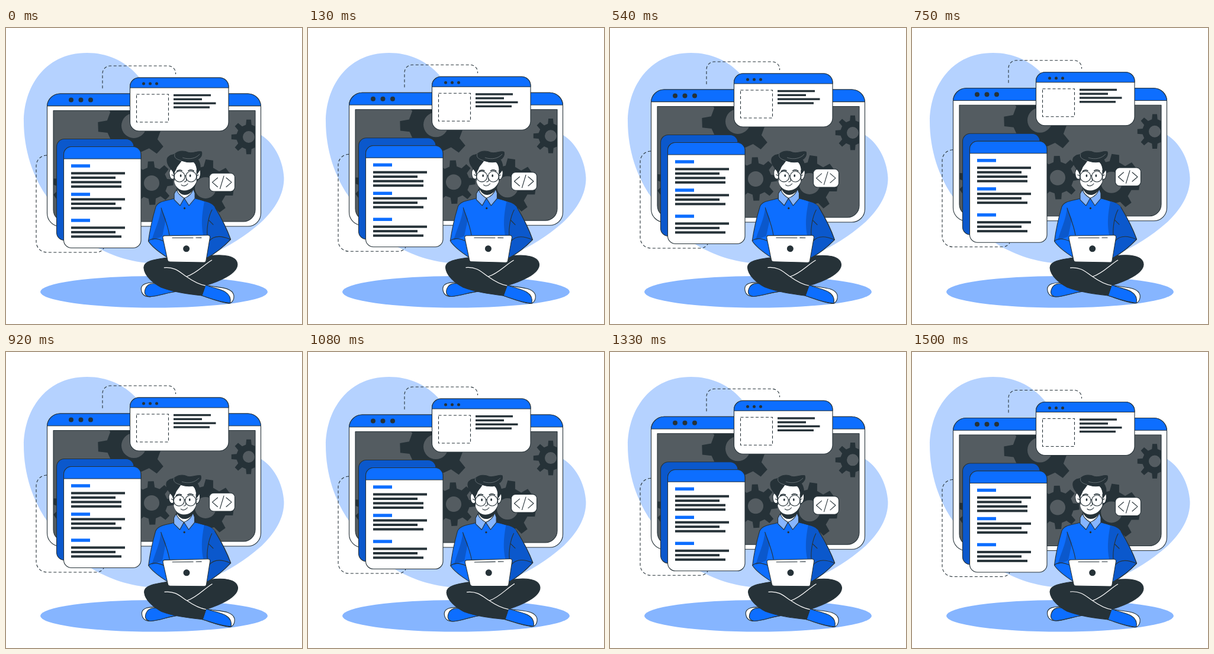
Animation of 500x500 px, one loop 1.54 s. Source, as an HTML page:

```html
<!DOCTYPE html>
<html lang="en">
<head>
<meta charset="utf-8">
<title>Developer at work</title>
<style>
  html, body { margin: 0; width: 100%; height: 100%; overflow: hidden; background: #fff; }
  svg { display: block; width: 100%; height: 100%; }
  .ink { fill: #263238; }
  .blue { fill: #0d6eff; }
  .deep { fill: #0b58cc; }
  .soft { fill: #86b5ff; }
  .paper { fill: #fff; }
  .edge { stroke: #263238; stroke-width: 1.1; stroke-linejoin: round; stroke-linecap: round; }
  .line { fill: none; }
  .dash { fill: none; stroke: #263238; stroke-width: 1.1; stroke-dasharray: 5 3.5; }
</style>
</head>
<body>
<svg viewBox="0 0 500 500">
  <defs>
    <clipPath id="screenClip"><path d="M80 139.500H421V307A20 20 0 0 1 401 327H100A20 20 0 0 1 80 307Z"/></clipPath>
  </defs>

  <path fill="#b5d2ff" d="M137 42C62 42 30 104 30 158C30 205 45 253 72 289C98 323 115 346 150 369C180 385 214 398 262 398C320 398 376 376 430 329C455 306 470 280 469.500 253C468 220 450 192 431 181C390 160 270 135 223 81C201 55 170 42 137 42Z"/>
  <ellipse class="soft" cx="250" cy="445.700" rx="192" ry="26.800"/>

  <g id="windows">
    <path class="dash" d="M163 102V77A13 13 0 0 1 176 64H274A12.500 12.500 0 0 1 286.500 78"/>
    <path class="dash" d="M69 215A18 18 0 0 0 51 233V361A18 18 0 0 0 69 379H152Q161 379 165 372"/>

    <rect class="paper edge" x="69.500" y="111" width="361" height="224" rx="22"/>
    <path class="blue edge" d="M69.500 131.700A22 22 0 0 1 91.500 111H408.500A22 22 0 0 1 430.500 131.700Z"/>
    <g class="ink">
      <circle cx="110" cy="121.500" r="4"/><circle cx="126.500" cy="121.500" r="4"/><circle cx="143" cy="121.500" r="4"/>
    </g>
    <path class="edge" fill="#545c61" d="M80 139.500H421V307A20 20 0 0 1 401 327H100A20 20 0 0 1 80 307Z"/>
    <g id="gears" class="ink" fill-rule="evenodd" clip-path="url(#screenClip)"></g>

    <rect class="deep edge" x="85.500" y="187.500" width="130.500" height="171" rx="13"/>
    <rect class="paper edge" x="97.500" y="200.500" width="130.500" height="171" rx="13"/>
    <path class="blue edge" d="M97.500 221V213.500A13 13 0 0 1 110.500 200.500H215A13 13 0 0 1 228 213.500V221Z"/>
    <g id="listing"></g>

    <rect class="paper edge" x="209.500" y="84" width="166.500" height="90" rx="15"/>
    <path class="blue edge" d="M209.500 101V99A15 15 0 0 1 224.500 84H361A15 15 0 0 1 376 99V101Z"/>
    <g class="ink">
      <circle cx="232.500" cy="94" r="2.500"/><circle cx="243.500" cy="94" r="2.500"/><circle cx="254.500" cy="94" r="2.500"/>
    </g>
    <rect class="dash" x="220.500" y="112" width="54" height="47"/>
    <g id="summary"></g>

    <rect class="paper edge" x="343.500" y="245.300" width="43" height="30.700" rx="7"/>
    <path class="line edge" d="M357.500 253L348.500 260.700L357.500 268.500M368 250L361.500 271.500M372 253L381 260.700L372 268.500"/>
  </g>

  <g id="person">
    <!-- shoes and legs -->
    <path class="paper edge" d="M256 431C240 429 228.500 432 228.500 441C229 450 235 454 243 454C260 453 274 446 290 445Z"/>
    <path class="blue edge" d="M258 433C245 430 238 434 235.500 441C233 448 235 453 243 454C260 453 274 446 290 445Z"/>
    <path class="paper edge" d="M337 434C355 439 381 436 385 451C386 459 382 465 376 465C360 463 344 456 331 452Z"/>
    <path class="blue edge" d="M337 434C350 439 364 441 371 446C379 451 380 459 379 464.500C360 463 344 456 331 452Z"/>
    <path class="ink edge" d="M272 388C250 391 233 394 233 405C234 419 249 431 262 438C283 446 306 449 331 452L337 435C360 428 391 415 391 399C390 384 366 382 343 385Z"/>
    <path class="line" stroke="#fff" stroke-width="1.200" d="M267 405C287 403 295 414 305 420C315 427 325 433 337 435M348 392C334 400 323 414 305 420"/>

    <!-- sweater -->
    <path class="blue edge" d="M284 288C271 292 257 292 253 302C248 319 243 341 240.500 360C245 368 259 379 273 388H340C353 381 367 370 379.500 357C372 336 362 318 353 303C347 294 330 291 317 287Z"/>
    <path class="deep" d="M262 304L270 323L264 352L246 359C251 341 260 324 262 304ZM335 293C330 318 330 334 333 350L343 352L340 387.500C353 381 367 370 379 357C371 336 362 318 353 303C349 297 342 294 335 293Z"/>
    <path class="line edge" d="M262 304C268 322 274 335 276 350M240.500 360C247 354 257 356 266 360M348 307C342 318 339 337 340 350M342 324L350 332M343 360C352 349 365 351 379 357"/>
    <path class="line edge" d="M353 303C362 318 372 336 379.500 357C367 370 353 381 340 388"/>

    <!-- neck and collar -->
    <path class="paper edge" d="M289 262V280L301 289L316 278V260Z"/>
    <path class="soft edge" d="M288 273L284 280L284 290L294 300L301 287.500C295 284 290 280 288 273ZM316 271L319 279V288L309 300L301 287.500C308 285 315 279 316 271Z"/>
    <circle class="ink" cx="301.500" cy="304.500" r="1.700"/>

    <!-- head -->
    <path class="paper edge" d="M283 238C277 236 275 242 276 248C277 255 281 257 284 254ZM323 238C329 237 329 244 328 249C327 255 324 257 321 255Z"/>
    <path class="ink" d="M285 258C287 272 293 282 302 282C313 282 320 270 322 258Z"/>
    <path class="paper" d="M284 236V259C286 269 293 274.500 301 274.500C311 274.500 319 268 322 258V230L305 220L290 224Z"/>
    <path class="line edge" d="M284 240V258M322 240V258"/>
    <path class="ink edge" d="M283 246C282 240 278 239 277 236C271 229 270 220 275 217C279 213 283 215 285 213C291 207 301 207 307 210C315 213 323 207 330 209C332 215 328 220 324 222C328 228 329 234 327 240L323 246C323 236 320 229 317 226C309 228 302 226 296 224C293 230 288 233 287 238Z"/>
    <path class="line" stroke="#7b8489" stroke-width=".7" d="M285 213C283 218 287 222 296 224M298 219C310 223 321 220 327 213"/>
    <g class="line edge">
      <circle cx="293" cy="251" r="9"/><circle cx="312.500" cy="251" r="9"/>
      <path d="M302 250Q303 248 304 250M284 250L280 248M321.500 250L325 248"/>
      <path d="M304 253C305 257 305 260 301 260M296 265C299 268 304 267 307 263"/>
      <path stroke-width="1.700" d="M288.500 242Q292 239 297 241M308 241Q313 238.500 317 241.500"/>
    </g>
    <g class="ink"><ellipse cx="295" cy="249.500" rx="1.400" ry="2.200"/><ellipse cx="311" cy="249.500" rx="1.400" ry="2.200"/></g>

    <!-- laptop -->
    <path class="paper edge" d="M268 351L341 350Q345 350 344.500 354L338 393Q337.500 396 334 396L277 395Q273.500 395 273 392L265 355Q264.500 351 268 351Z"/>
    <path class="line edge" d="M281 354.500H316M321 354.300H330"/>
    <circle class="ink" cx="304.700" cy="372.800" r="5.500"/>
  </g>
</svg>
<script>
const $ = id => document.getElementById(id);
const TAU = Math.PI * 2;

// Cog outline with tapered teeth and a round hole
function gear(cx, cy, outer, root, hole, turn, teeth = 8) {
  const step = TAU / teeth, points = [];
  for (let i = 0; i < teeth; i++) {
    const mid = turn * TAU / 360 + i * step;
    for (const [r, offset] of [[root, -.29], [outer, -.17], [outer, .17], [root, .29]]) {
      const a = mid + offset * step;
      points.push(`${(cx + r * Math.cos(a)).toFixed(2)} ${(cy + r * Math.sin(a)).toFixed(2)}`);
    }
  }
  return `<path d="M${points.join('L')}ZM${cx - hole} ${cy}a${hole} ${hole} 0 1 0 ${2 * hole} 0a${hole} ${hole} 0 1 0 ${-2 * hole} 0Z"/>`;
}

const bar = (x, y, right, height, tone = 'ink') =>
  `<rect class="${tone}" x="${x}" y="${y - height / 2}" width="${right - x}" height="${height}"/>`;

$('gears').innerHTML = [
  [216, 165, 61, 46, 21, -2],
  [246, 262, 37, 27, 13, -2],
  [337, 270, 48, 36, 18, 8],
  [410, 184, 29.5, 21, 10, 0],
  [112, 265, 36, 27, 13, 10]
].map(g => gear(...g)).join('');

$('listing').innerHTML = [
  [233, 12.4, [201, 185, 195, 195]],
  [281, 8.4, [201, 185, 195]],
  [325, 12.4, [201, 185, 195]]
].map(([top, gap, ends]) => bar(110, top, 142, 5.4, 'blue') +
  ends.map((end, i) => bar(110, top + gap + i * 7.5, end, 4)).join('')).join('');

$('summary').innerHTML = [346, 331, 354.5, 344]
  .map((end, i) => bar(283, 113.6 + i * 6.8, end, 3.4)).join('');

const LOOP = 1540, LEAD = 40;

function draw(now) {
  const p = ((now + LEAD) % LOOP) / LOOP;
  const lift = 1 - Math.abs(1 - 2 * p);
  const sway = p < .25 ? 4 * p : p < .75 ? 2 - 4 * p : 4 * p - 4;
  $('windows').setAttribute('transform', `translate(0 ${0.5 - 10 * lift})`);
  $('person').setAttribute('transform', `rotate(${sway} 309 337)`);
}

const start = performance.now();
function tick() {
  draw(performance.now() - start);
  requestAnimationFrame(tick);
}
tick();
</script>
</body>
</html>
```
